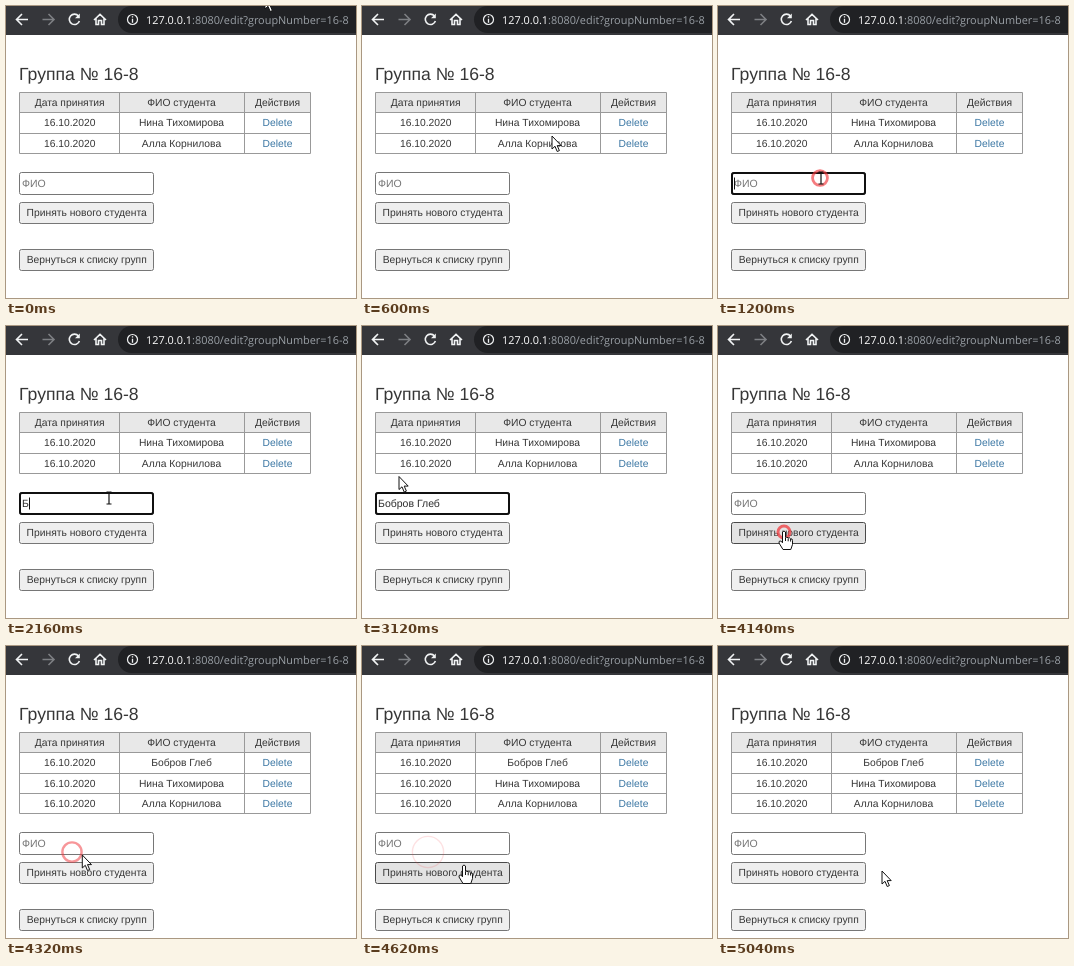
Animation of 350x292 px, one loop 5.16 s. Source, as an HTML page:

```html
<!DOCTYPE html>
<html lang="ru">
<head>
<meta charset="utf-8">
<style>
  html, body { margin: 0; width: 100%; height: 100%; overflow: hidden; background: #fff; }
  svg { display: block; }
  text { font: 10.3px "Liberation Sans", Arial, sans-serif; fill: #363636; text-rendering: geometricPrecision; white-space: pre; }
  .mid { text-anchor: middle; }
  .link { fill: #3a76a3; }
  .title { font-size: 17.6px; }
  .url { font: 10.9px "Open Sans", sans-serif; fill: #9aa0a6; }
  .grid { fill: none; stroke: #999; }
  .icon { fill: none; stroke: #f1f3f4; stroke-width: 1.6; }
  .button { fill: #efefef; stroke: #767676; }
  .button.hover { fill: #e3e3e3; stroke: #4a4a4a; }
  .input { fill: #fff; stroke: #767676; }
  .focus { fill: none; stroke: #101010; stroke-width: 2; }
  #value { font-size: 10.5px; }
  .pointer { fill: #fff; stroke: #111; stroke-linejoin: round; }
</style>
</head>
<body>
<svg width="350" height="292" viewBox="0 0 350 292">
  <rect width="350" height="29" fill="#35363a"/>
  <rect x="112" y="0" width="270" height="27" rx="13.5" fill="#202124"/>
  <g class="icon">
    <path d="M22 13.5H11.5M16 8L10.5 13.5L16 19"/>
    <path d="M36.5 13.5H47M42.5 8L48 13.5L42.5 19" stroke="#7d7f83"/>
    <path d="M72.5 10A5.2 5.2 0 1 0 73.4 15"/>
    <path d="M73.8 7.5V12.3H69Z" fill="#f1f3f4" stroke="none"/>
    <path d="M88 14L94 8.3L100 14M90 12.5V18.5H92.5V14.5H95.5V18.5H98V12.5"/>
    <circle cx="126.5" cy="13.5" r="5" stroke-width="1.2"/>
    <path d="M126.5 10.3V11.6M126.5 12.7V16.7" stroke-width="1.3"/>
  </g>
  <text class="url" x="140" y="17.5"><tspan fill="#fff">127.0.0.1</tspan>:8080/edit?groupNumber=16-8</text>

  <text class="title" x="13" y="74.2">Группа № 16-8</text>
  <g id="table"></g>
  <g id="form">
    <rect class="input" x="13.5" y="166.5" width="134" height="22" rx="2"/>
    <rect id="focus" class="focus" x="14" y="167" width="133" height="21" rx="2"/>
    <text id="value" x="16" y="181"></text>
    <path id="caret" d="M.5 171.5V183.5" stroke="#111"/>
    <rect id="add" class="button" x="13.5" y="196.5" width="134" height="21" rx="2"/>
    <text class="mid" x="80.7" y="210.2">Принять нового студента</text>
    <rect class="button" x="13.5" y="243.5" width="134" height="21" rx="2"/>
    <text class="mid" x="80.7" y="257.2">Вернуться к списку групп</text>
  </g>

  <circle id="ring" fill="none" stroke="#f0383c"/>
  <path id="arrow" class="pointer" d="M0 0V13L3 10.3L5.2 15.5L7.4 14.6L5.2 9.6H9.2Z"/>
  <path id="beam" d="M-2.5-6H-.6L0-5.4L.6-6H2.5M0-5.4V5.4M-2.5 6H-.6L0 5.4L.6 6H2.5" fill="none" stroke="#111" stroke-width="1.2"/>
  <path id="hand" class="pointer" d="M-1.5 1Q0-1 1.5 1V6.5Q3 5.5 4.2 7Q5.6 6.2 6.6 7.8Q8.5 7.4 8.5 9.5V13.5L6.8 18.5H-1L-5 12Q-5.3 9.5-3.2 10L-1.5 11.8ZM1.5 7V10M4.2 7.5V10.3M6.6 8V10.6"/>
</svg>
<script>
const LOOP = 5160, STEP = 60;
const DATE = '16.10.2020', NAME = 'Бобров Глеб';
const STUDENTS = ['Нина Тихомирова', 'Алла Корнилова'];
const FOCUS = 1080, TYPE = 2140, KEY = 44, SUBMIT = 4080, ADDED = 4260;
const TYPED = TYPE + KEY * (NAME.length - 1);

// time, x, y of the pointer
const PATH = [
  [0, 259, -10], [180, 280, 30], [420, 250, 100], [600, 190, 130], [960, 103, 172],
  [2700, 103, 172], [2880, 75, 186], [3120, 37, 150.5], [3240, 37, 150.5], [3600, 60, 217],
  [3900, 66, 205], [4200, 66, 205], [4620, 102, 219], [4920, 149, 223], [5040, 164, 225]
];
// press time, release time, end of ripple, x, y
const CLICKS = [[1080, 1140, 1640, 102, 172], [4020, 4140, 4740, 66, 206]];

const $ = id => document.getElementById(id);
const show = (id, on) => $(id).setAttribute('visibility', on ? 'visible' : 'hidden');
const rowTop = r => 86.5 + Math.round(r * 20.3);

function tableMarkup(names) {
  const rows = [['Дата принятия', 'ФИО студента', 'Действия'], ...names.map(n => [DATE, n, 'Delete'])];
  const bottom = rowTop(rows.length);
  let out = `<rect x="13.5" y="86.5" width="291" height="20" fill="#e8e8e8"/>`;
  let lines = `M13.5 86.5H304.5V${bottom}H13.5ZM113.5 86.5V${bottom}M238.5 86.5V${bottom}`;
  rows.forEach((cells, r) => {
    if (r) lines += `M13.5 ${rowTop(r)}H304.5`;
    cells.forEach((cell, c) => {
      const link = r && c === 2 ? ' link' : '';
      out += `<text class="mid${link}" x="${[63.7, 175.5, 271.5][c]}" y="${rowTop(r) + 13.7}">${cell}</text>`;
    });
  });
  return out + `<path class="grid" d="${lines}"/>`;
}

function pointerAt(t) {
  const i = PATH.findIndex(p => p[0] > t);
  if (i < 0) return PATH[PATH.length - 1].slice(1);
  const [t0, x0, y0] = PATH[i - 1], [t1, x1, y1] = PATH[i];
  const k = (t - t0) / (t1 - t0);
  return [x0 + (x1 - x0) * k, y0 + (y1 - y0) * k];
}

function drawForm(t) {
  const focused = t >= FOCUS && t < SUBMIT;
  const count = focused && t >= TYPE ? Math.floor((t - TYPE) / KEY) + 1 : 0;
  const value = $('value');
  value.textContent = count ? NAME.slice(0, count) : 'ФИО';
  value.style.fill = count ? '#2c2c2c' : '#757575';
  show('focus', focused);

  const since = t < TYPE ? t - FOCUS : Math.max(0, t - TYPED);
  show('caret', focused && since % 1000 < 500);
  const end = count ? value.getComputedTextLength() : 0;
  $('caret').setAttribute('transform', `translate(${Math.round(16 + end)})`);
}

function drawPointer(t, shift) {
  const [x, y] = pointerAt(t);
  const inside = (top, height) => x > 13 && x < 148 && y > top + shift && y < top + shift + height;
  const overAdd = inside(196, 22);
  const kind = overAdd || inside(243, 22) ? 'hand' : inside(166, 23) ? 'beam' : 'arrow';
  for (const id of ['arrow', 'beam', 'hand']) show(id, id === kind);
  $(kind).setAttribute('transform', `translate(${x} ${y})`);
  $('add').classList.toggle('hover', overAdd);
}

function drawRing(t) {
  const click = CLICKS.find(c => t >= c[0] && t < c[2]);
  show('ring', click);
  if (!click) return;
  const [, up, end, x, y] = click;
  const k = Math.max(0, (t - up) / (end - up));
  const attrs = { cx: x, cy: y, r: 6 + 12 * k, 'stroke-width': 3 - 2 * k, opacity: 0.75 * (1 - k) };
  for (const name in attrs) $('ring').setAttribute(name, attrs[name]);
}

let rowCount = 0;
function draw(now) {
  const t = Math.floor(now % LOOP / STEP) * STEP;
  const names = t >= ADDED ? [NAME, ...STUDENTS] : STUDENTS;
  const shift = t >= ADDED ? 20 : 0;
  if (names.length !== rowCount) {
    rowCount = names.length;
    $('table').innerHTML = tableMarkup(names);
    $('form').setAttribute('transform', `translate(0 ${shift})`);
  }
  drawForm(t);
  drawPointer(t, shift);
  drawRing(t);
}

const start = performance.now();
function tick() {
  draw(performance.now() - start);
  requestAnimationFrame(tick);
}
tick();
</script>
</body>
</html>
```
